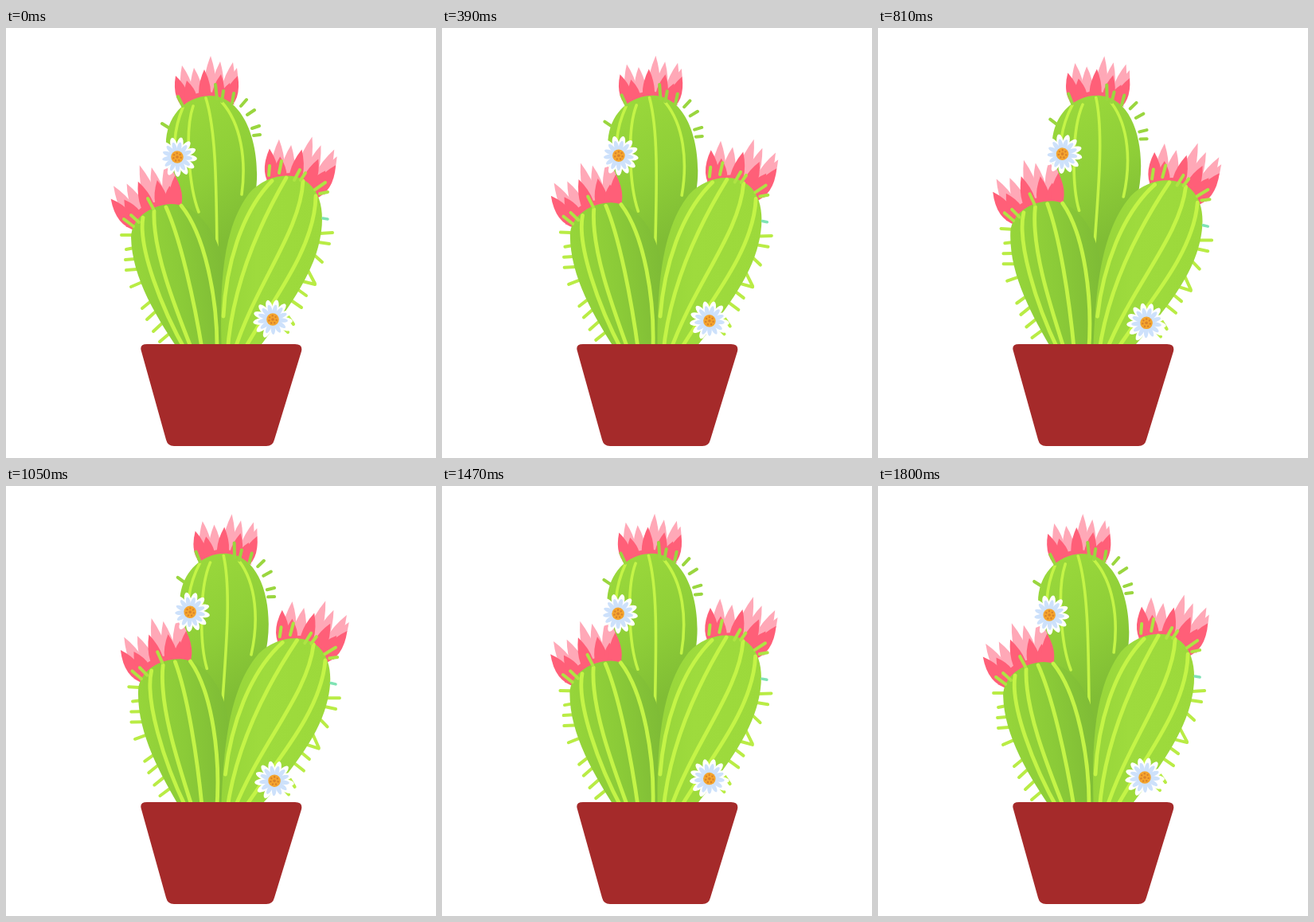
Recreate the animation shown at these times as an HTML page. Size 540x540 px, loop 1830 ms.

```html
<!DOCTYPE html>
<html lang="en">
<head>
<meta charset="utf-8">
<title>Swaying cactus</title>
<style>
html, body { margin: 0; width: 100%; height: 100%; overflow: hidden; background: #fff; }
svg { display: block; width: 100vw; height: 100vh; }
.line { fill: none; stroke: #c4f447; stroke-linecap: round; }
</style>
</head>
<body>
<svg viewBox="0 0 540 540">
  <defs>
    <linearGradient id="midFill" x2=".25" y2="1">
      <stop stop-color="#9cda3c"/><stop offset=".4" stop-color="#8fcf38"/><stop offset=".7" stop-color="#80bd35"/>
    </linearGradient>
    <linearGradient id="leftFill" y1=".4" y2=".25">
      <stop stop-color="#97d63a"/><stop offset=".5" stop-color="#8bcb38"/><stop offset="1" stop-color="#7dba36"/>
    </linearGradient>
    <linearGradient id="rightFill">
      <stop stop-color="#97d53a"/><stop offset=".35" stop-color="#9edb3d"/><stop offset="1" stop-color="#9cd93b"/>
    </linearGradient>
    <g id="flower"></g>
    <g id="daisy"></g>
  </defs>

  <g id="mid">
    <use href="#flower" transform="translate(252 92)"/>
    <path fill="url(#midFill)" d="M272 396C225 300 205 200 201 150C199 115 222 86 256 85C297 85 317 140 315 190C312 260 290 330 272 396Z"/>
    <path class="line" stroke-width="3.6" d="M222 100C217 112 213 126 212 142M235 98C224 130 230 200 242 231M251 88C264 130 264 200 265 278M271 93C295 120 302 165 296 209"/>
    <path id="midSpikes" class="line" stroke-width="4" style="stroke:#9ad63f"/>
  </g>

  <g id="sides">
    <use href="#flower" transform="translate(184 233) rotate(-20) scale(1.1)"/>
    <path class="line" id="leftSpikes" stroke-width="4" style="stroke:#b9ec45"/>
    <path fill="url(#leftFill)" d="M222 412C190 365 158 315 157 262C158 240 180 222 208 221C245 222 269 265 273 300C276 340 274 370 273 412Z"/>
    <path class="line" stroke-width="4.8" d="M172 238C166 275 194 350 227 408M186 230C184 280 212 350 235 408M201 225C219 265 236 340 247 408M220 223C250 260 266 340 265 408"/>
    <path class="line" id="leftTopSpikes" stroke-width="4" style="stroke:#aee443"/>

    <use href="#flower" transform="translate(364 196) rotate(14) scale(1.1)"/>
    <path class="line" id="rightSpikes" stroke-width="4" style="stroke:#b9ec45"/>
    <path fill="url(#rightFill)" d="M271 412C268 330 270 255 305 208C325 185 360 178 380 195C400 212 400 245 392 275C380 320 345 365 310 412Z"/>
    <path class="line" stroke-width="4.8" d="M334 192C295 232 276 300 273 362M352 188C322 240 284 320 278 408M373 192C370 255 314 320 286 408M389 211C388 280 328 350 297 408"/>
    <path class="line" id="rightTopSpikes" stroke-width="4" style="stroke:#aee443"/>
    <path class="line" stroke-width="3.5" style="stroke:#7fe3b4" d="M398 239L404 240"/>
    <use href="#daisy" transform="translate(335 366)"/>
  </g>
  <g id="midDaisy"><use href="#daisy" transform="translate(215 162)"/></g>

  <path fill="#a52a2a" d="M177 397H363Q373 397 371 406L337 517Q335 525 327 525H211Q203 525 201 517L170 406Q167 397 177 397Z"/>
</svg>
<script>
const $ = id => document.getElementById(id);

// Leaf shape from a base point to a pointed tip.
function leaf(bx, by, tx, ty, w, fill) {
  const dx = tx - bx, dy = ty - by, len = Math.hypot(dx, dy);
  const nx = -dy / len * w, ny = dx / len * w;
  const mx = bx + dx * .4, my = by + dy * .4;
  return `<path fill="${fill}" d="M${bx} ${by}Q${mx + nx} ${my + ny} ${tx} ${ty}Q${mx - nx} ${my - ny} ${bx} ${by}Z"/>`;
}

const petals = (tips, w, fill) =>
  tips.map(([x, y]) => leaf(x * .62, 12, x, y, w, fill)).join('');

$('flower').innerHTML =
  petals([[-31, -45], [-16, -42], [5, -57], [17, -50], [33, -49], [38, -42]], 15, '#ffa8b7') +
  petals([[-39, -32], [-25, -26], [-3, -40], [18, -34], [29, -23], [39, -32]], 15, '#ff5f78') +
  '<path fill="#ff5f78" d="M-34 4Q0 -28 35 4Z"/>';

function ring(n, from, length, width, turn, fill) {
  let out = '';
  for (let i = 0; i < n; i++)
    out += `<ellipse cx="${from + length / 2}" rx="${length / 2}" ry="${width / 2}" fill="${fill}" transform="rotate(${turn + i * 360 / n})"/>`;
  return out;
}

$('daisy').innerHTML =
  ring(13, 4, 21, 8.5, 5, '#fff') +
  ring(13, 4, 15, 5.6, 5, '#cde1fb') +
  '<circle r="7.8" fill="#f5a52e"/>' +
  ring(7, 3.5, 2.6, 2.4, 10, '#d9822b') +
  '<circle r="1.8" fill="#d9822b"/>';

// Each spike is x1, y1, x2, y2.
function spikes(id, ...list) {
  $(id).setAttribute('d', list.map(([a, b, c, d]) => `M${a} ${b}L${c} ${d}`).join(''));
}
spikes('midSpikes', [216, 86, 222, 98], [263, 71, 265, 89], [273, 79, 271, 92],
  [286, 82, 284, 94], [302, 90, 295, 98], [312, 103, 303, 109],
  [318, 123, 309, 126], [319, 134, 311, 135], [196, 120, 204, 125]);
spikes('leftSpikes', [145, 260, 158, 260], [151, 278, 161, 276], [150, 291, 162, 290],
  [151, 304, 164, 303], [157, 325, 171, 319], [171, 352, 182, 343],
  [177, 366, 189, 355], [185, 381, 198, 369], [193, 394, 206, 383]);
spikes('leftTopSpikes', [148, 240, 160, 249], [157, 235, 167, 244], [178, 214, 185, 227]);
spikes('rightSpikes', [394, 258, 410, 257], [392, 269, 406, 271], [387, 285, 397, 294],
  [379, 304, 388, 321], [372, 318, 388, 322], [366, 328, 377, 336],
  [358, 342, 371, 351], [349, 355, 361, 372], [340, 368, 354, 382]);
spikes('rightTopSpikes', [331, 173, 330, 185], [346, 167, 343, 182], [369, 178, 362, 191],
  [376, 182, 370, 191], [401, 194, 388, 203], [404, 206, 394, 208]);

const LOOP = 1830, STEP = 30;

function draw(now) {
  const u = Math.floor(now % LOOP / STEP) * STEP / LOOP;
  // Mostly sinusoidal sway, with a slightly quicker start.
  const sway = .75 * (1 - Math.cos(2 * Math.PI * u)) / 2 + .25 * (1 - Math.abs(1 - 2 * u));
  const midTurn = `rotate(${5.2 * sway} 268 353)`;
  $('mid').setAttribute('transform', midTurn);
  $('midDaisy').setAttribute('transform', midTurn);
  $('sides').setAttribute('transform', `rotate(${4 * sway} 271 400)`);
}

const start = performance.now();
function tick() {
  draw(performance.now() - start);
  requestAnimationFrame(tick);
}
tick();
</script>
</body>
</html>
```
